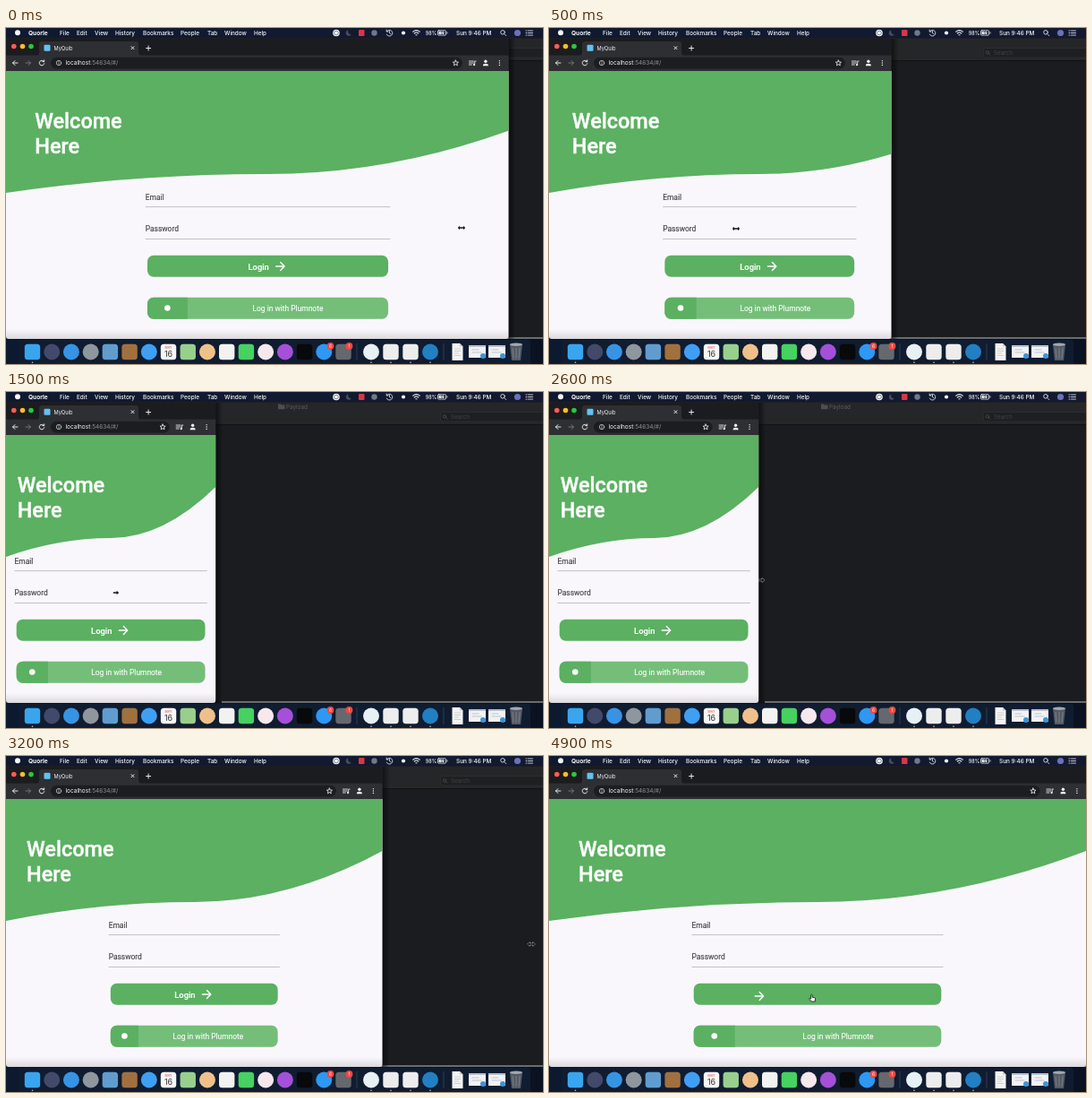
Write an HTML page that moves like this. It is 600 px wide and 375 px high and loops after 5 s.

```html
<!DOCTYPE html>
<html lang="en">
<head>
<meta charset="utf-8">
<title>Responsive login</title>
<style>
html, body { margin: 0; width: 100%; height: 100%; overflow: hidden; background: #0b1424; }
svg { display: block; width: 100vw; height: 100vh; }
.ui { font-family: Inter, "Open Sans", sans-serif; }
.page { font-family: Roboto, "Open Sans", sans-serif; }
.line { fill: none; stroke-linecap: round; stroke-linejoin: round; }
</style>
</head>
<body>
<svg id="stage" viewBox="0 0 600 375" xmlns="http://www.w3.org/2000/svg">
  <defs>
    <linearGradient id="bar"><stop stop-color="#0f1a31"/><stop offset="1" stop-color="#131a30"/></linearGradient>
    <linearGradient id="desk"><stop stop-color="#0c1a30"/><stop offset="1" stop-color="#0a1222"/></linearGradient>
    <linearGradient id="shade"><stop stop-opacity=".55"/><stop offset="1" stop-opacity="0"/></linearGradient>
    <linearGradient id="foot" x2="0" y2="1"><stop stop-opacity="0"/><stop offset="1" stop-opacity=".12"/></linearGradient>
    <clipPath id="winClip"><rect id="winBox" y="11.5" height="335.5" rx="3"/></clipPath>
  </defs>
  <rect width="600" height="375" fill="url(#desk)"/>
  <rect width="600" height="11.5" fill="url(#bar)"/>
  <g id="menu" class="ui" font-size="6.4" font-weight="500" fill="#f7f8fa"></g>

  <g id="files" class="ui" font-size="6.3">
    <rect y="11.5" width="600" height="335" fill="#1b1c1f"/>
    <rect y="11.5" width="600" height="25" fill="#252628"/>
    <path d="M0 36.5H600" stroke="#0e0e10" stroke-width=".8"/>
    <path d="M241 346H600" stroke="#85888a" stroke-width="1.6"/>
    <path d="M304 13.5h3l1 1h3.5v4.8h-7.5z" fill="#4d4e51"/>
    <text x="313" y="18.5" fill="#5c5d60">Payload</text>
    <rect x="485.5" y="22.5" width="118" height="10.5" rx="2" fill="#1e1f21" stroke="#303134" stroke-width=".7"/>
    <g class="line" stroke="#525356" stroke-width=".7"><circle cx="490" cy="27.3" r="1.7"/><path d="M491.3 28.7l1.5 1.5"/></g>
    <text x="497" y="30" fill="#434447">Search</text>
  </g>

  <rect id="shadow" y="12" width="8" height="335" fill="url(#shade)"/>
  <g clip-path="url(#winClip)">
    <rect y="11" width="600" height="37" fill="#1b1c1f"/>
    <path d="M34 30.5q3 0 3-3V18q0-3 3-3h105q3 0 3 3v9.500q0 3 3 3H600V48H0V30.500z" fill="#2e2f32"/>
    <circle cx="8.800" cy="20.500" r="2.800" fill="#fb5d56"/>
    <circle cx="18.500" cy="20.500" r="2.800" fill="#fcbc2e"/>
    <circle cx="28" cy="20.500" r="2.800" fill="#29c740"/>
    <rect x="42.500" y="18.800" width="7" height="7" rx="1" fill="#62c3f2"/>
    <text class="ui" x="53.500" y="24.500" font-size="5.700" fill="#eff0f2">MyQuib</text>
    <g class="line" stroke="#eff0f2" stroke-width=".95">
      <path d="M140 20.700l3 3m0-3l-3 3M156.600 22.500h5m-2.500-2.500v5"/>
      <path d="M13 39H7.500m2.500-2.500L7.500 39l2.500 2.500"/>
      <path d="M22 39h5.500m-2.500-2.500l2.500 2.500-2.500 2.500" stroke="#77787c"/>
      <path d="M42.300 37.300A2.800 2.800 0 1 0 42.800 39.700M42.700 35.800v1.800h-1.900"/>
    </g>
    <rect id="omni" x="50" y="32.800" height="12.600" rx="6.300" fill="#1c1d20"/>
    <g class="line" stroke="#c8cacd" stroke-width=".8"><circle cx="59" cy="39" r="2.700"/><path d="M59 38.800v1.600m0-3v.1"/></g>
    <text class="ui" x="66.500" y="41.400" font-size="6.500" fill="#929498"><tspan fill="#f4f5f6">localhost</tspan>:54634/#/</text>
    <g id="tools">
      <g class="line" stroke="#e4e5e8" stroke-width=".9">
        <path d="M-59.500 36l.9 2 2.200.2-1.700 1.400.5 2.200-1.900-1.200-1.900 1.200.5-2.200-1.700-1.400 2.200-.2z"/>
        <path d="M-44.500 37h5m-5 2h5m-5 2h3m3.300 0v-4h1.400"/>
      </g>
      <g fill="#f4f5f6">
        <circle cx="-38.900" cy="41.100" r="1.100"/>
        <circle cx="-26" cy="37.300" r="1.700"/><path d="M-29 42.200q0-2.400 3-2.400t3 2.400z"/>
        <circle cx="-10.500" cy="36.600" r=".7"/><circle cx="-10.500" cy="39" r=".7"/><circle cx="-10.500" cy="41.400" r=".7"/>
      </g>
    </g>

    <rect y="48" width="600" height="300" fill="#f9f7fb"/>
    <rect y="336" width="600" height="11" fill="url(#foot)"/>
    <path id="wave" fill="#5bb061"/>
    <g id="title" class="page" font-size="23.440" font-weight="500" fill="#fff" stroke="#fff" stroke-width=".4">
      <text y="112">Welcome</text><text y="139.500">Here</text>
    </g>
    <g id="form" class="page" font-size="8.440" fill="#3c3c3e">
      <g stroke="#3c3c3e" stroke-width=".12"><text y="192">Email</text><text y="227.400">Password</text></g>
      <path id="rules" stroke="#c2c1c4" stroke-width="1"/>
    </g>
    <g id="buttons" class="page" fill="#fff">
      <rect id="login" y="253.800" height="24" rx="7" fill="#5bb061"/>
      <text id="loginText" y="269.500" font-size="9.375" font-weight="500" stroke="#fff" stroke-width=".15">Login</text>
      <path id="arrow" class="line" d="M-4.800 0H4.600M.2-4.500L4.600 0 .2 4.500" stroke="#fff" stroke-width="1.400"/>
      <rect id="social" y="300.800" height="24" rx="7" fill="#74be79"/>
      <path id="badge" fill="#5bb061"/>
      <circle id="mark" cy="312.500" r="3.300"/>
      <text id="socialText" y="316" font-size="8.440" text-anchor="middle" stroke="#fff" stroke-width=".12">Log in with Plumnote</text>
    </g>
  </g>

  <rect x="14" y="348" width="572" height="30" rx="3" fill="#101c30"/>
  <g id="dock" class="ui"></g>

  <g id="cursor" stroke-linejoin="round">
    <path id="resize" fill="#111" stroke="#fff" stroke-width=".8" paint-order="stroke"/>
    <path id="pointer" d="M-1-4V3.600L.7 2 2 4.700l1.300-.6L2.100 1.500H4.400z" fill="#111" stroke="#fff" stroke-width=".7"/>
    <path id="hand" d="M-1.300 1V-3.300q.7-1 1.400 0V-.8l2.600.6q1 .2.900 1.200L3.200 4H-.7l-2.600-3q.3-1.200 1.200-.6z" fill="#fff" stroke="#111" stroke-width=".8"/>
  </g>
</svg>
<script>
const $ = id => document.getElementById(id);
const set = (id, attrs) => {
  for (const key in attrs) $(id).setAttribute(key, attrs[key]);
};
const move = (id, x, y = 0) => set(id, { transform: `translate(${x} ${y})` });
const show = (id, on) => set(id, { visibility: on ? 'visible' : 'hidden' });

const LOOP = 5000, STEP = 100;

// Keys are [time, value]; values between them are linear.
function track(keys, t) {
  const i = keys.findIndex(k => k[0] > t);
  if (i < 0) return keys[keys.length - 1][1];
  if (i === 0) return keys[0][1];
  const [t0, a] = keys[i - 1], [t1, b] = keys[i];
  return a + (b - a) * (t - t0) / (t1 - t0);
}

const NARROW = 234.2;
const grow = [[2700, NARROW], [3000, 318], [3200, 420.5], [3400, 520], [3600, 590], [3700, 600]];
const windowWidth = [[0, 561.5], [500, 382.5], [700, 325], [900, 280], [1200, 243], [1300, NARROW], ...grow];
const layoutWidth = [[0, 585], [500, 470.5], [700, 400], [900, 325], [1200, 250], [1300, NARROW], ...grow];
const cursorX = [[0, 509], [500, 209], [700, 165], [1000, 130], [1300, 123], [1500, 123], [2000, 230],
  [2600, 237.5], [2700, 246], [3000, 370], [3200, 587], [3300, 596], [3600, 596], [3900, 336], [4300, 294]];
const cursorY = [[0, 223], [500, 224], [1500, 224], [2000, 211], [2600, 210], [3600, 210], [3900, 254], [4300, 270]];

const MOBILE = 281, PRESS = 4600;
const DOUBLE = 'M-4.200 0l2.200-2.200v1.500h4v-1.500L4.200 0 2 2.200V.7h-4v1.500z';
const SINGLE = 'M-3.200-.7H.6v-1.500L3.200 0 .6 2.200V.7H-3.200z';

function drawPage(size, t) {
  const mid = size / 2;
  const field = (size < MOBILE ? size : mid) - 19;
  const left = mid - field / 2;
  const x = left + 2.2, width = field - 4.4, part = width / 6;

  set('wave', { d: `M0 48V184Q${size * .25} 163 ${mid} 163Q${size * .75} 163 ${size} 106V48z` });
  move('title', size * .0558 - .4);
  move('form', left);
  set('rules', { d: `M0 199.600h${field}M0 235.500h${field}` });
  set('login', { x, width });
  set('social', { x, width });
  set('badge', { d: `M${x + part} 300.800v24H${x + 7}a7 7 0 0 1-7-7v-10a7 7 0 0 1 7-7z` });
  set('mark', { cx: x + part / 2 });
  set('socialText', { x: x + part + (width - part) / 2 });
  set('loginText', { x: mid - 22 });

  const slide = Math.min(1, Math.max(0, (t - PRESS) / 300));
  show('loginText', t < PRESS);
  move('arrow', mid + 14 - 79 * slide, 266 + 2 * slide);
}

function drawCursor(t) {
  const dragging = t < 3700, hand = t >= 4000;
  move('cursor', track(cursorX, t), track(cursorY, t));
  set('resize', { d: t >= 1300 && t < 2700 ? SINGLE : DOUBLE });
  show('resize', dragging);
  show('pointer', !dragging && !hand);
  show('hand', hand);
}

function draw(t) {
  const width = track(windowWidth, t);
  set('winBox', { width });
  set('shadow', { x: width });
  set('omni', { width: width - 101.5 });
  move('tools', width + .4);
  drawPage(track(layoutWidth, t), t);
  drawCursor(t);
}

function buildMenu() {
  const labels = [[60, 'File'], [79, 'Edit'], [99, 'View'], [122, 'History'], [153, 'Bookmarks'],
    [195, 'People'], [225, 'Tab'], [244, 'Window'], [277, 'Help'], [503, 'Sun 9:46 PM']];
  $('menu').innerHTML = `
    <circle cx="13" cy="5.300" r="3"/>
    <text x="25" y="7.700" font-weight="700" font-size="6.600">Quorle</text>
    ${labels.map(([x, s]) => `<text x="${x}" y="7.700">${s}</text>`).join('')}
    <text x="468.800" y="7.600" font-size="5.500">98%</text>
    <circle cx="369" cy="5.500" r="3.800"/><circle cx="369" cy="5.500" r="2.300" stroke="#151b2e" stroke-width=".5"/>
    <path d="M382.500 2.300a3.300 3.300 0 1 0 3.500 4.800 3.300 3.300 0 0 1-3.500-4.800z" fill="#474d5f"/>
    <rect x="394" y="2" width="6.500" height="7" rx="1" fill="#d93644"/>
    <circle cx="411.500" cy="5.500" r="3.200" fill="#737887"/>
    <circle cx="444" cy="5.500" r="2.100"/>
    <g class="line" stroke="#f2f3f6" stroke-width=".8">
      <path d="M425.500 3.800a3.400 3.400 0 1 1-.2 3.300M425.200 2v2h2M428.500 3.500v2.200l1.500 1"/>
      <path d="M454.700 4.200q3.800-3.200 7.600 0M456.200 6q2.300-1.900 4.600 0M457.900 7.800h1.200" stroke-width="1.100"/>
      <rect x="482.500" y="2.700" width="9" height="5.400" rx="1"/><path d="M493 4.700v1.400"/>
      <circle cx="555" cy="4.800" r="2.300"/><path d="M556.800 6.600l2 2"/>
      <path d="M581 3h1m1.500 0h5M581 5.500h1m1.500 0h5M581 8h1m1.500 0h5"/>
    </g>
    <rect x="483.600" y="3.800" width="5.800" height="3.200"/>
    <path d="M487.600 2.500l-2 3.300h1.500l-.6 2.600 2.200-3.500h-1.600z" fill="#f2f3f6" stroke="#151b2e" stroke-width=".4"/>
    <circle cx="571.500" cy="5.500" r="3.600" fill="#6a72b8"/>`;
}

function buildDock() {
  const icons = ['#39a5ee', 'o#42496a', 'o#3793e4', 'o#90969e', '#609dce', '#a0713f', 'o#3f9ff3', '#f7f7f7',
    '#99cf8d', 'o#efc08a', '#f2f2f0', '#46d160', 'o#f7e8ee', 'o#a550d8', '#08090b', 'o#2e98f3', '#65686e'];
  const apps = ['o#e7f0f4', '#ededed', '#ededed', 'o#227fc2'];
  const shape = (spec, x) => spec[0] === 'o'
    ? `<circle cx="${x}" cy="361.500" r="9" fill="${spec.slice(1)}"/>`
    : `<rect x="${x - 8.7}" y="352.800" width="17.400" height="17.400" rx="3.500" fill="${spec}"/>`;
  const dot = x => `<circle cx="${x}" cy="373.300" r=".8" fill="#c4cad4"/>`;
  const badge = x => `<circle cx="${x}" cy="355" r="3.900" fill="#f4463d"/>
    <text x="${x}" y="356.900" font-size="5" fill="#fff" text-anchor="middle">${x < 370 ? 6 : 1}</text>`;
  const thumb = x => `<rect x="${x - 9.5}" y="354" width="19" height="14" fill="#f2f3f5"/>
    <path d="M${x - 9.5} 355h19" stroke="#b8bfca" stroke-width="2"/>
    <path d="M${x - 6} 359h8m-8 3h11" stroke="#a6adb8" stroke-width=".7"/>
    <circle cx="${x + 6.500}" cy="366" r="3" fill="#3c94d8"/>`;

  $('dock').innerHTML = icons.map((s, i) => shape(s, 29.500 + 21.720 * i)).join('')
    + apps.map((s, i) => shape(s, 408 + 22 * i) + dot(408 + 22 * i)).join('')
    + dot(29.5) + badge(362.5) + badge(383.5)
    + `<text x="181.500" y="357.500" font-size="3.600" fill="#e5483f" text-anchor="middle">MAY</text>
      <text x="181.500" y="367" font-size="9" fill="#333" text-anchor="middle">16</text>
      <path d="M392 352v19M489 352v19" stroke="#46526a" stroke-width=".6"/>
      <path d="M498.500 352h8.500l3.500 3.500V371h-12z" fill="#f4f4f4"/>
      <path d="M507 352v3.500h3.500" fill="#ccc"/>
      <path d="M501 358h7m-7 2.500h7m-7 2.500h5m-5 2.500h7" stroke="#b5b5b5" stroke-width=".6"/>`
    + thumb(526.5) + thumb(548.5)
    + `<path d="M563 353h14l-2 18h-10z" fill="#555b64"/>
      <ellipse cx="570" cy="353.300" rx="7" ry="1.700" fill="#a2a8b0"/>
      <path d="M566 357l1 12m3-12v12m4-12l-1 12" stroke="#8a9099" stroke-width=".7"/>`;
}

buildMenu();
buildDock();
const start = performance.now();
function tick() {
  const t = (performance.now() - start) % LOOP;
  draw(Math.floor(t / STEP) * STEP);
  requestAnimationFrame(tick);
}
tick();
</script>
</body>
</html>
```
